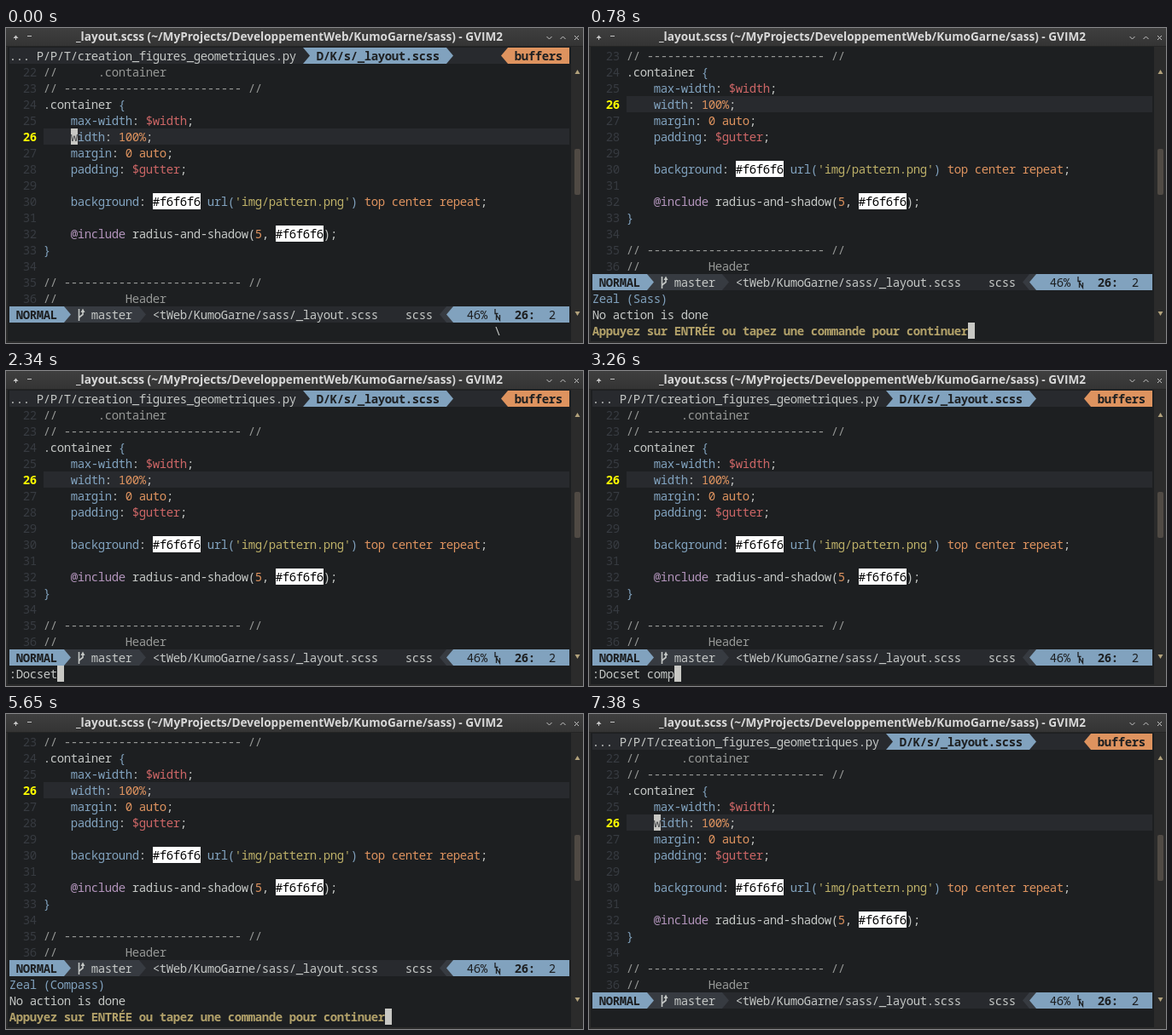
Animation of 676 by 370 pixels, one loop 7.85 s. Source, as an HTML page with a canvas:

```html
<!DOCTYPE html>
<html lang="fr">
<head>
<meta charset="utf-8">
<title>Editor session</title>
<style>
html, body { margin: 0; width: 100%; height: 100%; overflow: hidden; background: #1d1f21; }
canvas { display: block; }
</style>
</head>
<body>
<canvas id="stage" width="676" height="370"></canvas>
<script>
const ctx = document.getElementById('stage').getContext('2d');
const LOOP = 7850, LEFT = 4, TOP = 23, CW = 8, RH = 19;
const MONO = '14px "Noto Sans Mono", "DejaVu Sans Mono", monospace';
const C = {
  bg: '#1d1f21', bar: '#282a2e', mid: '#373b41', fg: '#c5c8c6', dim: '#969896',
  blue: '#81a2be', red: '#cc6666', orange: '#de935f', string: '#bdb068',
  purple: '#b294bb', prompt: '#b3a26a', cursor: '#c8c8c4'
};

const rule = [['// -------------------------- //', C.dim]];
const prop = (name, ...rest) => [['    ' + name, C.blue], [': ', C.fg], ...rest, [';', C.fg]];
const swatch = ['#f6f6f6', '#000', '#fff'];
const code = {
  22: [['//      .container', C.dim]],
  23: rule,
  24: [['.container', C.fg], [' {', C.blue]],
  25: prop('max-width', ['$width', C.red]),
  26: prop('width', ['100%', C.orange]),
  27: prop('margin', ['0 auto', C.orange]),
  28: prop('padding', ['$gutter', C.red]),
  30: prop('background', swatch, [' url(', C.blue], ["'img/pattern.png'", C.string],
    [')', C.blue], [' top center repeat', C.orange]),
  32: [['    @include', C.purple], [' radius-and-shadow(', C.fg], ['5', C.orange], [', ', C.fg],
    swatch, [');', C.fg]],
  33: [['}', C.blue]],
  35: rule,
  36: [['//          Header', C.dim]]
};

const colX = col => LEFT + col * CW;
const rowY = row => TOP + row * RH;

function box(x, y, w, h, color) {
  ctx.fillStyle = color;
  ctx.fillRect(x, y, w, h);
}

function poly(color, ...pts) {
  ctx.fillStyle = color;
  ctx.beginPath();
  for (const [x, y] of pts) ctx.lineTo(x, y);
  ctx.fill();
}

function stroke(color, width, ...pts) {
  ctx.strokeStyle = color;
  ctx.lineWidth = width;
  ctx.beginPath();
  for (const [x, y] of pts) ctx.lineTo(x, y);
  ctx.stroke();
}

// One glyph per terminal cell
function put(text, col, row, color, bold) {
  ctx.font = (bold ? 'bold ' : '500 ') + MONO;
  ctx.textAlign = 'center';
  ctx.fillStyle = color;
  [...text].forEach((ch, i) => ctx.fillText(ch, colX(col + i) + CW / 2, rowY(row) + 15));
}

function fill(col, row, cols, color) {
  box(colX(col), rowY(row), cols * CW, RH, color);
}

// Powerline separator filling one cell; dir 1 points right, -1 left
function wedge(col, row, color, dir) {
  const x = colX(col) + (dir < 0 ? CW : 0), y = rowY(row);
  poly(color, [x, y], [x + dir * CW, y + RH / 2], [x, y + RH]);
}

function chrome() {
  const g = ctx.createLinearGradient(0, 0, 0, 22);
  g.addColorStop(0, '#3f3f3f');
  g.addColorStop(1, '#343434');
  box(0, 0, 676, 370, '#2b2b2b');
  box(0, 0, 676, 22, g);
  box(2, 22, 660, 346, C.bg);
  box(0, 21, 676, 1, '#252525');

  ctx.font = 'bold 13.6px "Open Sans", "Noto Sans", sans-serif';
  ctx.textAlign = 'center';
  ctx.fillStyle = '#d8d8d8';
  ctx.fillText('_layout.scss (~/MyProjects/DeveloppementWeb/KumoGarne/sass) - GVIM2', 332, 15);

  const ink = '#c4c4c4';
  poly(ink, [8.5, 12], [11.5, 8.5], [14.5, 12]);
  box(11, 11, 1, 3, ink);
  box(25, 9, 5, 1, ink);
  stroke(ink, 1, [633.5, 10], [636.5, 13], [639.5, 10]);
  stroke(ink, 1, [649.5, 13], [652.5, 10], [655.5, 13]);
  stroke(ink, 1, [666, 9], [671, 14]);
  stroke(ink, 1, [671, 9], [666, 14]);

  poly('#b3a27c', [666.5, 54], [669.5, 49], [672.5, 54]);
  poly('#b3a27c', [666.5, 333], [669.5, 338], [672.5, 333]);
  ctx.fillStyle = '#504a44';
  ctx.beginPath();
  ctx.roundRect(666, 142, 7, 54, 2);
  ctx.fill();
}

function tabline() {
  fill(0, 0, 82, C.bar);
  put('... P/P/T/creation_figures_geometriques.py', 0, 0, C.fg);
  fill(43, 0, 21, C.blue);
  wedge(43, 0, C.bar, 1);
  put('D/K/s/_layout.scss', 45, 0, C.bg, true);
  wedge(64, 0, C.blue, 1);
  wedge(72, 0, C.orange, -1);
  fill(73, 0, 9, C.orange);
  put('buffers', 74, 0, C.bg, true);
}

function codeLine(n, row) {
  const current = n === 26;
  if (current) fill(5, row, 77, C.bar);
  put(String(n), 2, row, current ? '#ffff00' : C.mid, current);
  let col = 5;
  for (const [text, color, back] of code[n] || []) {
    if (back) fill(col, row, text.length, back);
    put(text, col, row, color);
    col += text.length;
  }
}

function status(row) {
  const x = colX(10), lx = colX(71), y = rowY(row);
  fill(0, row, 82, C.bar);
  fill(0, row, 19, C.mid);
  wedge(19, row, C.mid, 1);
  fill(0, row, 8, C.blue);
  wedge(8, row, C.blue, 1);
  put('NORMAL', 1, row, C.bg, true);

  // branch symbol
  stroke(C.fg, 1.6, [x + 1.5, y + 3], [x + 1.5, y + 17]);
  stroke(C.fg, 1.6, [x + 1.5, y + 13], [x + 6, y + 9.5], [x + 6, y + 5]);
  poly(C.fg, [x + 3.5, y + 7], [x + 6, y + 2.5], [x + 8.5, y + 7]);

  put('master', 12, row, C.fg);
  put('<tWeb/KumoGarne/sass/_layout.scss', 21, row, C.fg);
  put('scss', 58, row, C.fg);
  wedge(63, row, C.mid, -1);
  fill(64, row, 1, C.mid);
  wedge(64, row, C.blue, -1);
  fill(65, row, 17, C.blue);
  put('46%', 67, row, C.bg);

  // line-number symbol
  stroke(C.bg, 1.3, [lx + 1, y + 3], [lx + 1, y + 8.5], [lx + 4.5, y + 8.5]);
  stroke(C.bg, 1.3, [lx + 2.5, y + 16], [lx + 2.5, y + 10], [lx + 6.5, y + 16], [lx + 6.5, y + 10]);

  put('26:', 74, row, C.bg, true);
  put('2', 79, row, C.bg);
}

function cursor(col, row, glyph = '') {
  fill(col, row, 1, C.cursor);
  put(glyph, col, row, '#4a4c4e');
}

// Editor window shifted up by some rows, optionally without its top two rows
function editor(shift, partial) {
  if (!shift && !partial) tabline();
  for (let n = partial ? 23 : Math.max(22, 21 + shift); n <= 36; n++) codeLine(n, n - 21 - shift);
  status(16 - shift);
}

function normal({ cmd = '', keys = '', caret = true }) {
  editor(0);
  put(cmd, 0, 17, C.fg);
  put(keys, 71, 17, C.fg);
  if (caret) cursor(9, 5, 'w');
}

const typed = ':Docset compass';

function typing(count) {
  editor(0);
  put(typed.slice(0, count), 0, 17, C.fg);
  cursor(count, 17);
}

function search(docset, caret = true) {
  editor(1);
  put(`Zeal (${docset})`, 0, 16, C.blue);
  put('Search for: ', 0, 17, C.fg);
  if (caret) cursor(12, 17);
}

function cancelled(docset) {
  const ask = 'Appuyez sur ENTRÉE ou tapez une commande pour continuer';
  editor(2);
  put(`Zeal (${docset})`, 0, 15, C.blue);
  put('No action is done', 0, 16, C.fg);
  put(ask, 0, 17, C.prompt, true);
  cursor(ask.length, 17);
}

function restoring(docset) {
  editor(0, true);
  put(`Zeal (${docset})`, 0, 17, C.blue);
}

const steps = [
  [0, normal, { keys: '\\' }],
  [290, normal, { caret: false }],
  [340, search, 'Sass'],
  [780, cancelled, 'Sass'],
  [980, restoring, 'Sass'],
  [1030, normal, {}],
  [1500, typing, 1], [1760, typing, 2], [1940, typing, 3], [2090, typing, 4], [2160, typing, 5],
  [2340, typing, 7], [2740, typing, 8], [2970, typing, 9], [3070, typing, 10], [3160, typing, 11],
  [3260, typing, 12], [3340, typing, 13], [3470, typing, 14], [3610, typing, 15],
  [3760, normal, { cmd: typed }],
  [4460, normal, { cmd: typed, caret: false }],
  [4510, normal, { cmd: typed, keys: '\\' }],
  [4750, normal, { cmd: typed, caret: false }],
  [4800, search, 'Compass'],
  [5460, search, 'Compass', false],
  [5650, cancelled, 'Compass'],
  [5790, restoring, 'Compass'],
  [5840, normal, {}],
  [6490, normal, { caret: false }],
  [6740, normal, {}],
  [7130, normal, { caret: false }],
  [7380, normal, {}]
];

const start = performance.now();
function frame(now) {
  const t = Math.max(0, now - start) % LOOP;
  const [, draw, ...args] = steps.findLast(s => s[0] <= t);
  chrome();
  draw(...args);
  requestAnimationFrame(frame);
}
frame(start);
</script>
</body>
</html>
```
